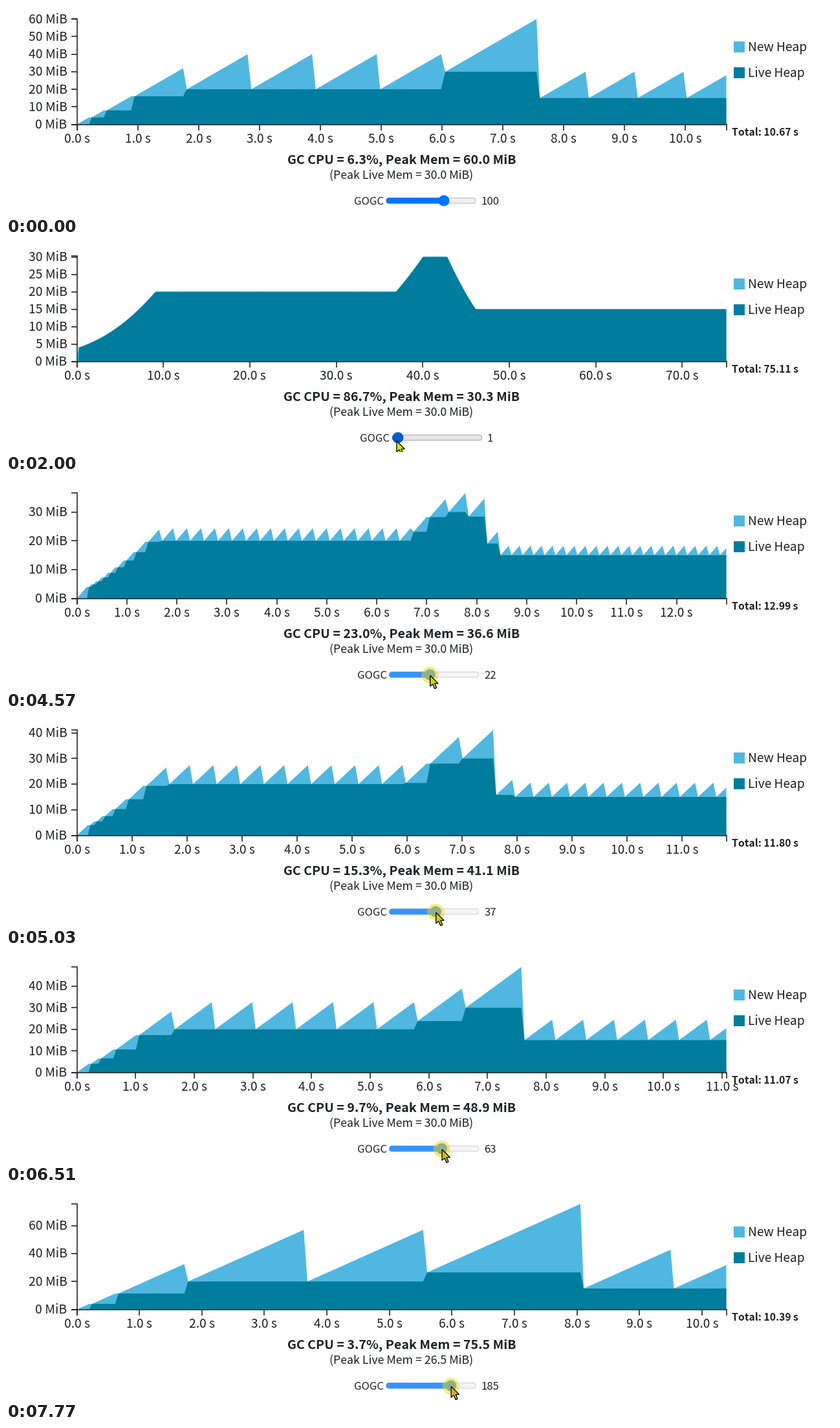
Recreate the animation shown at these times as a matplotlib script. Size 1280 by 324 pixels, loop 8000 ms.

```python
import math

import matplotlib.pyplot as plt
import numpy as np
from matplotlib.animation import FuncAnimation
from matplotlib.patches import Circle, FancyBboxPatch, Polygon, Rectangle

W, H, DPI = 1280, 324, 100
INTERVAL, LOOP = 40, 8000
PT = 72 / DPI  # points per pixel

LEFT, RIGHT, TOP, BASE = 109.5, 1113.5, 20.2, 183.6
NEW, LIVE, INK = "#50b7e0", "#007d9c", "#1f2123"

# Workload: CPU seconds and the live heap (MiB) at each; allocation is steady.
APP_TIME = [0, 1, 5, 5.5, 6, 6.5, 10]
APP_LIVE = [0, 20, 20, 30, 30, 15, 15]
ALLOC_RATE, SCAN_RATE, GC_FIXED, MIN_HEAP = 20, 1024, 0.04, 4

# Pointer strokes: start ms, end ms, steps, GOGC value under the pointer.
FIRST = 2.0 ** 18
STROKES = [
    (230, 680, 7, 100), (920, 990, 2, 76), (1160, 1770, 9, 0.6),
    (2000, 2000, 1, 0.87), (2090, 2180, 2, 1.22), (2630, 2930, 5, 2),
    (3090, 3260, 3, 3), (3410, 3480, 2, 4), (3560, 4180, 9, 17),
    (4260, 4410, 3, 20), (4570, 4570, 1, 22), (4640, 4640, 1, 27),
    (4800, 5030, 4, 37), (5200, 5510, 5, 39), (5650, 5880, 4, 55),
    (6370, 6510, 3, 63), (6600, 6740, 3, 65), (7440, 7770, 5, 185),
]
ENTER, PRESS, RELEASE, PRESS_AGAIN = 230, 920, 2000, 2400

# Slider colours: fill, track, border.
IDLE = ("#0075ff", "#efefef", "#b2b2b2")
HOVER = ("#005cc8", "#e5e5e5", "#9c9c9c")
ACTIVE = ("#3793ff", "#f5f5f5", "#cbcbcb")
TRACK_W, THUMB_R = 138, 8.5

ARROW = np.array([(0, 0), (0, 17), (4, 13.5), (7, 20.5),
                  (10, 19), (7, 12.5), (12.3, 12.3)])
LIME, GOLD = np.array([0.78, 0.94, 0.0]), np.array([0.84, 0.70, 0.10])

plt.rcParams["font.family"] = ["Noto Sans CJK JP"]
fig = plt.figure(figsize=(W / DPI, H / DPI), dpi=DPI, facecolor="white")
ax = fig.add_axes([0, 0, 1, 1])


def simulate(gogc):
    """Run the collector; returns times, live heap, total heap and GC time."""
    t = app = live = gc_time = 0.0
    points = [(0, 0, 0)]
    while True:
        target = max(MIN_HEAP, live * (1 + gogc / 100))
        run = (target - live) / ALLOC_RATE
        if app + run >= APP_TIME[-1]:
            run = APP_TIME[-1] - app
            points.append((t + run, live, live + run * ALLOC_RATE))
            return (*np.array(points).T, gc_time)
        app += run
        t += run
        points.append((t, live, target))
        live = float(np.interp(app, APP_TIME, APP_LIVE))
        pause = GC_FIXED + live / SCAN_RATE
        t += pause
        gc_time += pause
        points.append((t, live, live))


def ticks(span, count):
    raw = span / count
    unit = 10 ** math.floor(math.log10(raw))
    ratio = raw / unit
    factor = next((f for f, edge in ((10, 50), (5, 10), (2, 2))
                   if ratio >= math.sqrt(edge)), 1)
    return np.arange(0, span + 1e-9, unit * factor)


def text(x, y, s, size, ha="left", weight="normal"):
    ax.text(x, y, s, fontsize=size * PT, ha=ha, va="baseline",
            weight=weight, color=INK)


def line(xs, ys):
    ax.plot(xs, ys, color=INK, lw=1.6 * PT, solid_capstyle="butt",
            solid_joinstyle="miter")


def pill(x, w, face, edge):
    ax.add_patch(FancyBboxPatch((x, 297.7), w, 8.2, fc=face, ec=edge,
                                lw=0.9 * PT,
                                boxstyle="round,pad=0,rounding_size=4"))


def draw_chart(gogc):
    t, live, heap, gc_time = simulate(gogc)
    total, peak = t[-1], heap.max()

    def px(v):
        return LEFT + (RIGHT - LEFT) * v / total

    def py(v):
        return BASE - (BASE - TOP) * v / peak

    for series, color in ((heap, NEW), (live, LIVE)):
        ax.fill(np.r_[px(t), RIGHT, LEFT], np.r_[py(series), BASE, BASE],
                color=color, lw=0)

    line([LEFT - 9, LEFT, LEFT, LEFT - 9], [TOP, TOP, BASE, BASE])
    line([LEFT, LEFT, RIGHT, RIGHT], [BASE + 9.5, BASE, BASE, BASE + 9.5])
    for v in ticks(peak, 5):
        line([LEFT - 9, LEFT], [py(v)] * 2)
        text(94.5, py(v) + 6.4, f"{v:.0f} MiB", 19.3, "right")
    for v in ticks(total, 10):
        line([px(v)] * 2, [BASE, BASE + 9.5])
        text(px(v), 211.6, f"{v:.1f} s", 19.2, "center")

    for y, label, color in ((55, "New Heap", NEW), (95, "Live Heap", LIVE)):
        ax.add_patch(Rectangle((1125, y), 16.5, 16.5, fc=color, lw=0))
        text(1147, y + 15, label, 19.2)
    text(1122, 201, f"Total: {total:.2f} s", 15.7, weight="bold")
    text(611.5, 245, f"GC CPU = {100 * gc_time / total:.1f}%, "
         f"Peak Mem = {peak:.1f} MiB", 19.6, "center", "bold")
    text(611.5, 268, f"(Peak Live Mem = {live.max():.1f} MiB)", 17.8, "center")


def draw_slider(gogc, level, colors):
    """Draw the log2 slider; returns the left end of the thumb's travel."""
    fill, track, border = colors
    shift = 4.7 * (3 - len(str(gogc)))
    x0 = 588 + shift
    thumb = x0 + THUMB_R + level / 10 * (TRACK_W - 2 * THUMB_R)
    text(538 + shift, 308, "GOGC", 16.7)
    text(734.5 + shift, 308, str(gogc), 16.7)
    pill(x0, TRACK_W, track, border)
    pill(x0, thumb - x0, fill, fill)
    ax.add_patch(Circle((thumb, 301.8), THUMB_R, fc=fill, lw=0))
    return x0 + THUMB_R


def pointer_level(t):
    level = math.log2(FIRST)
    for start, end, steps, value in STROKES:
        if t < start:
            break
        done = steps if t >= end else 1 + int((t - start) / (end - start) * (steps - 1))
        level += (math.log2(value) - level) * done / steps
    return level


def draw(i):
    t = i * INTERVAL + 30
    ax.cla()
    ax.set(xlim=(0, W), ylim=(H, 0))
    ax.axis("off")

    pointer = pointer_level(t)
    pressed = PRESS <= t < RELEASE or t >= PRESS_AGAIN
    if t < PRESS:
        level = math.log2(100)
    else:
        level = min(max(pointer, 0), 10) if pressed else 0
    gogc = max(1, round(2 ** level))

    draw_chart(gogc)
    ax.plot([0, W], [H - 0.5] * 2, color="#cfcfcf", lw=PT)
    colors = ACTIVE if pressed else HOVER if t >= ENTER and pointer < 10.7 else IDLE
    x0 = draw_slider(gogc, level, colors)
    if t < ENTER:
        return

    x = x0 + 12.1 * pointer + 0.5
    y = 303
    if t < PRESS:
        y += 1.1 * (pointer - math.log2(100))
    elif RELEASE <= t < 2090:
        y = 307
    if pressed:
        ax.add_patch(Circle((x - 0.5, y - 0.5), 13, fc="#f5d200", alpha=0.47, lw=0))
    mix = min(max((t - 2000) / 5700, 0), 1)
    ax.add_patch(Polygon(ARROW + (x, y), fc=LIME + (GOLD - LIME) * mix,
                         ec="black", lw=1.3 * PT, joinstyle="miter"))


anim = FuncAnimation(fig, draw, frames=LOOP // INTERVAL, interval=INTERVAL,
                     init_func=lambda: None, repeat=True, repeat_delay=0)
plt.show()
```
